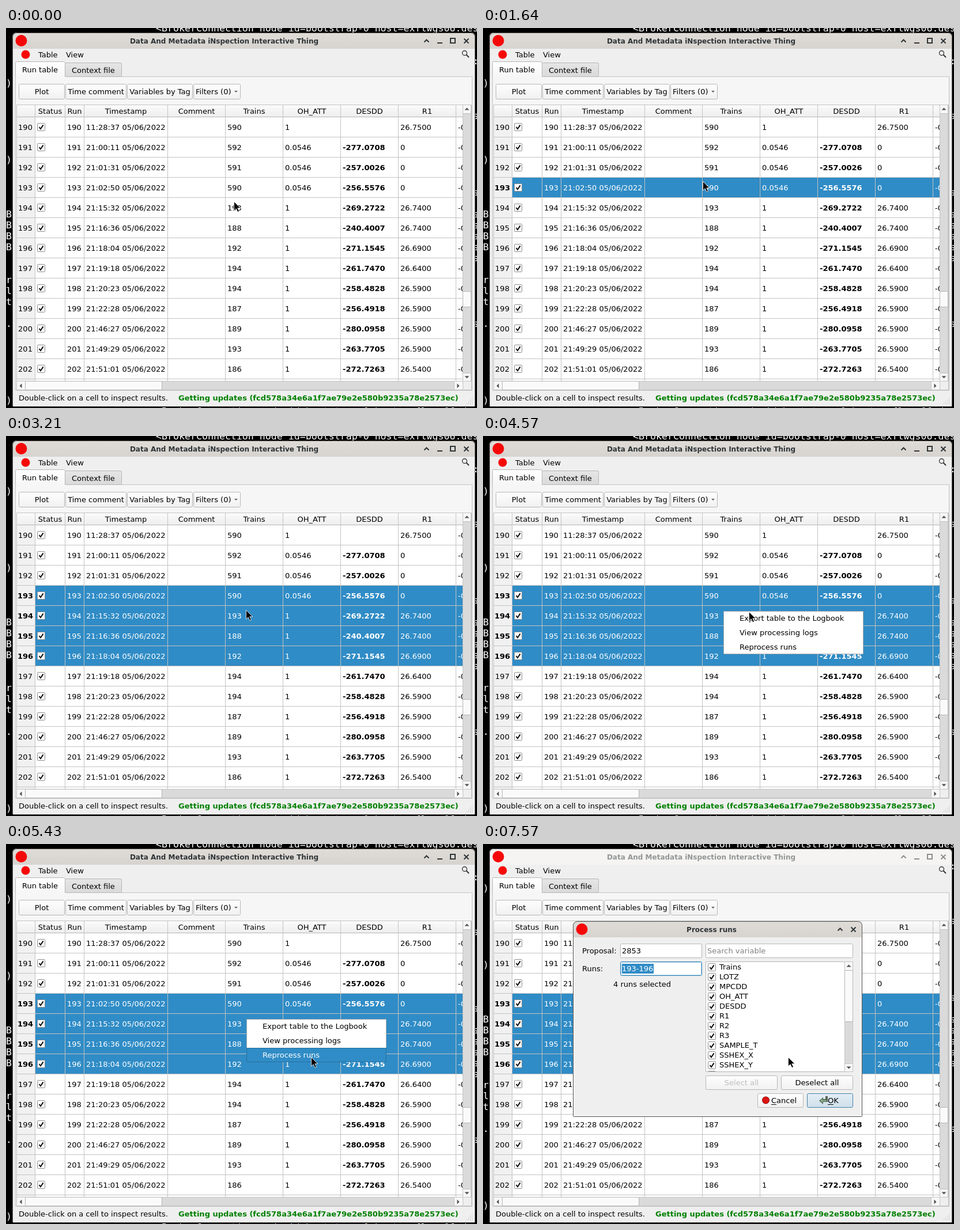
These frames come from a looping animation (817 px wide and 660 px high, 8000 ms). An HTML page with a canvas:

```html
<!DOCTYPE html>
<html lang="en">
<head>
<meta charset="utf-8">
<title>Run table</title>
<style>
html, body { margin: 0; width: 100%; height: 100%; overflow: hidden; background: #000; }
canvas { display: block; width: 817px; height: 660px; }
</style>
</head>
<body>
<canvas id="stage" width="817" height="660"></canvas>
<script>
const ctx = document.getElementById('stage').getContext('2d');
const LOOP = 8000, FPS = 14;
const SANS = '13px "DejaVu Sans", sans-serif';
const BOLD = 'bold 13px "DejaVu Sans", sans-serif';
const TITLE = 'bold 12px "DejaVu Sans", sans-serif';
const MONO = '16.6px "DejaVu Sans Mono", monospace';
const BLUE = '#308cc6', BG = '#efefef', GRID = '#c3c3c3', EDGE = '#b6b6b6';

// Ticks at which the state changes
const SELECT_ONE = 23, SELECT_FOUR = 33, MENU = 53, HOVER = 65, FRAME = 99, DIALOG = 100, CARET_OFF = 106;

// Pointer path: tick, x, y
const PATH = [
  [0, 395, 301], [10, 395, 301], [17, 381, 266], [32, 381, 266], [33, 386, 387], [42, 386, 387],
  [45, 416, 302], [60, 416, 302], [64, 461, 305], [72, 527, 362], [74, 567, 369], [75, 567, 369],
  [76, 529, 370], [200, 529, 370]
];

const COLUMNS = [50, 102, 135, 280, 380, 480, 580, 680, 780];
const HEADERS = ['Status', 'Run', 'Timestamp', 'Comment', 'Trains', 'OH_ATT', 'DESDD', 'R1'];
const ROWS = `11:28:37 590 1 . 26.7500
21:00:11 592 0.0546 -277.0708 0
21:01:31 591 0.0546 -257.0026 0
21:02:50 590 0.0546 -256.5576 0
21:15:32 193 1 -269.2722 26.7400
21:16:36 188 1 -240.4007 26.7400
21:18:04 192 1 -271.1545 26.6900
21:19:18 194 1 -261.7470 26.6400
21:20:23 194 1 -258.4828 26.5900
21:22:28 187 1 -256.4918 26.5900
21:46:27 189 1 -280.0958 26.5900
21:49:29 193 1 -263.7705 26.5900
21:51:01 186 1 -272.7263 26.5400`.split('\n').map(line => line.split(' '));
const MENU_ITEMS = ['Export table to the Logbook', 'View processing logs', 'Reprocess runs'];
const VARIABLES = ['Trains', 'LOTZ', 'MPCDD', 'OH_ATT', 'DESDD', 'R1', 'R2', 'R3', 'SAMPLE_T', 'SSHEX_X', 'SSHEX_Y', ''];

function text(s, x, y, color = '#000', font = SANS, align = 'left') {
  ctx.font = font;
  ctx.fillStyle = color;
  ctx.textAlign = align;
  ctx.fillText(s, x, y);
}

function fill(x, y, w, h, color) {
  ctx.fillStyle = color;
  ctx.fillRect(x, y, w, h);
}

function shade(y, h, top, bottom) {
  const g = ctx.createLinearGradient(0, y, 0, y + h);
  g.addColorStop(0, top);
  g.addColorStop(1, bottom);
  return g;
}

function box(x, y, w, h, color, edge, radius = 0) {
  ctx.beginPath();
  ctx.roundRect(x + .5, y + .5, w - 1, h - 1, radius);
  ctx.fillStyle = color;
  ctx.fill();
  ctx.strokeStyle = edge;
  ctx.lineWidth = 1;
  ctx.stroke();
}

function line(points, color = '#000', width = 1) {
  ctx.beginPath();
  points.forEach(([x, y]) => ctx.lineTo(x, y));
  ctx.strokeStyle = color;
  ctx.lineWidth = width;
  ctx.stroke();
}

function shape(points, color) {
  ctx.beginPath();
  points.forEach(([x, y]) => ctx.lineTo(x, y));
  ctx.closePath();
  ctx.fillStyle = color;
  ctx.fill();
}

function disc(x, y, r, color) {
  ctx.beginPath();
  ctx.arc(x, y, r, 0, Math.PI * 2);
  ctx.fillStyle = color;
  ctx.fill();
}

function clipped(x, y, w, h, draw) {
  ctx.save();
  ctx.beginPath();
  ctx.rect(x, y, w, h);
  ctx.clip();
  draw();
  ctx.restore();
}

function arrow(x, y, dx, dy) {
  shape([[x + dx * 2, y + dy * 2], [x - dx * 2 + dy * 4, y - dy * 2 + dx * 4],
    [x - dx * 2 - dy * 4, y - dy * 2 - dx * 4]], '#505050');
}

function button(x, y, w, h, label, color = '#000') {
  box(x, y, w, h, shade(y, h, '#fefefe', '#f1f1f1'), EDGE, 2);
  text(label, x + w / 2, y + h / 2 + 4.5, color, SANS, 'center');
}

function checkbox(x, y) {
  box(x, y, 14, 14, '#fff', '#8c8c8c', 1);
  line([[x + 3.5, y + 7], [x + 6, y + 10.3], [x + 10.6, y + 3.4]], '#111', 2);
}

function chevron(x, y, color) {
  line([[x - 4, y + 2.5], [x, y - 1.5], [x + 4, y + 2.5]], color, 2);
}

function cross(x, y, color) {
  line([[x - 4, y - 4], [x + 4, y + 4]], color, 2);
  line([[x - 4, y + 4], [x + 4, y - 4]], color, 2);
}

function titleBar(x, y, w, label, active) {
  ctx.beginPath();
  ctx.roundRect(x, y, w, 28, [7, 7, 0, 0]);
  ctx.fillStyle = active ? shade(y, 28, '#dfdcd8', '#d7d3cf') : '#f5f4f3';
  ctx.fill();
  text(label, x + w / 2 - (w > 600 ? 34 : 10.5), y + 18.5, active ? '#2e3436' : '#929595', TITLE, 'center');
  disc(x + 15.5, y + 14, 10, '#f60808');
}

function outline(x, y, w, h) {
  ctx.beginPath();
  ctx.roundRect(x + .5, y + .5, w - 1, h - 1, [7, 7, 1, 1]);
  ctx.strokeStyle = '#55534f';
  ctx.lineWidth = 1;
  ctx.stroke();
}

function terminal(scrolled) {
  fill(0, 0, 817, 660, '#000');
  const shift = scrolled ? -19 : 0;
  const put = (s, x, row) => text(s, x, 6 + row * 19 + shift, '#fff', MONO);
  const log = '<BrokerConnection node_id=bootstrap-0 host=exflwgs06.desy.de';
  text(log, 260, 6, '#fff', MONO);
  if (!scrolled) put(log, 260, 35);
  [[')', 5], [')', 12], ['B', 17], ['B', 18], ['B', 19], ['B', 20], ['r', 23], ['l', 24], ['t', 25], ['.', 27], [')', 34]]
    .forEach(([s, row]) => put(s, 0, row));
  [3, 8, 15, 17, 18, 19, 20, 21, 27].forEach(row => put(row === 3 ? ':' : 's', 810, row));
}

function windowChrome(active) {
  const ink = active ? '#2e3436' : '#8b8e8f';
  fill(12, 36, 801, 621, BG);
  titleBar(11, 8, 803, 'Data And Metadata iNspection Interactive Thing', active);
  chevron(729.5, 22, ink);
  fill(748, 25, 9, 2, ink);
  ctx.strokeStyle = ink;
  ctx.lineWidth = 2;
  ctx.strokeRect(771, 18, 8, 8);
  cross(798.5, 22.5, ink);
  outline(11, 8, 803, 650);

  disc(34, 46, 7.5, '#f60808');
  text('Table', 56, 51);
  text('View', 104, 51);
  ctx.beginPath();
  ctx.arc(795.5, 43.5, 4, 0, Math.PI * 2);
  ctx.strokeStyle = '#333';
  ctx.lineWidth = 1.3;
  ctx.stroke();
  line([[798.5, 46.5], [803, 51]], '#333', 2);

  box(16, 84, 793, 546, '#f6f6f6', GRID);
  box(102, 60, 99, 25, shade(60, 25, '#e6e6e6', '#d9d9d9'), EDGE, 2);
  box(16, 58, 87, 28, shade(58, 28, '#fff', '#f6f6f6'), EDGE, 2);
  fill(17, 83, 85, 4, '#f6f6f6');
  text('Run table', 28, 77);
  text('Context file', 114, 78);

  button(22, 97, 80, 27, 'Plot');
  button(103, 97, 106, 27, 'Time comment');
  button(210, 97, 114, 27, 'Variables by Tag');
  button(325, 97, 82, 27, '');
  text('Filters (0)', 329, 115);
  shape([[396, 109], [402, 109], [399, 112]], '#606060');

  text('Double-click on a cell to inspect results.', 22, 647);
  text('Getting updates (fcd578a34e6a1f7ae79e2e580b9235a78e2573ec)', 299, 647, '#008000', BOLD);
  for (let i = 0; i < 4; i++)
    for (let j = 0; j <= i; j++) fill(808 - j * 3, 643 + i * 3, 1, 1, '#b0b0b0');
}

function table(first, last, focus) {
  box(18, 133, 790, 496, '#fff', GRID);
  fill(19, 134, 774, 20, shade(134, 20, '#fbfbfb', '#eeeeee'));
  fill(19, 155, 31, 459, '#f1f1f1');
  HEADERS.forEach((name, i) => {
    const right = COLUMNS[i + 1];
    text(name, (COLUMNS[i] + right) / 2 + .5, 149, '#000', SANS, 'center');
  });

  clipped(19, 134, 774, 480, () => {
    ROWS.forEach(([time, trains, att, desdd, r1], i) => {
      const top = 155 + i * 35, base = top + 22, run = 190 + i;
      const on = run >= first && run <= last, ink = on ? '#fff' : '#000';
      if (on) fill(51, top, 742, 35, BLUE);
      text(run, 33.5, base, '#000', on ? BOLD : SANS, 'center');
      checkbox(54, top + 10);
      text(run, 106, base, ink);
      text(time + ' 05/06/2022', 139, base, ink);
      text(trains, 384, base, ink);
      text(att, 484, base, ink);
      if (desdd !== '.') text(desdd, 584, base, ink, BOLD);
      text(r1, 684, base, ink);
      text('-0.0', 784, base, ink);
      fill(19, top + 34, 774, 1, GRID);
    });
    fill(19, 154, 774, 1, EDGE);
    COLUMNS.forEach(x => fill(x, 134, 1, 480, GRID));
    if (focus) {
      ctx.setLineDash([1, 1]);
      ctx.strokeStyle = '#1f6c9e';
      ctx.lineWidth = 1;
      ctx.strokeRect(381.5, 155.5 + (focus - 190) * 35, 98, 33);
      ctx.setLineDash([]);
    }
  });

  box(792, 133, 15, 481, '#dadada', GRID);
  box(792, 133, 15, 16, '#f8f8f8', GRID);
  box(792, 457, 15, 28, '#fafafa', EDGE);
  box(792, 599, 15, 15, '#f8f8f8', GRID);
  arrow(799.5, 140.5, 0, -1);
  arrow(799.5, 606.5, 0, 1);
  box(18, 613, 775, 16, '#dadada', GRID);
  box(18, 613, 16, 16, '#f8f8f8', GRID);
  box(33, 613, 238, 16, '#fafafa', EDGE);
  box(777, 613, 16, 16, '#f8f8f8', GRID);
  arrow(25.5, 621.5, -1, 0);
  arrow(784.5, 621.5, 1, 0);
  fill(793, 614, 14, 14, BG);
}

function contextMenu(active) {
  box(417, 304, 243, 75, '#fff', '#a9a9a9');
  MENU_ITEMS.forEach((label, i) => {
    const on = i === active;
    if (on) box(417, 304 + i * 25, 243, 25, BLUE, '#266f9e');
    text(label, 445, 321 + i * 25, on ? '#fff' : '#000');
  });
}

function dialogFrame() {
  fill(157, 162, 3, 311, '#f1f1f1');
  fill(653, 162, 4, 311, '#f1f1f1');
  fill(157, 469, 500, 4, '#f1f1f1');
  titleBar(156, 134, 502, 'Process runs', true);
  chevron(619.5, 148, '#2e3436');
  cross(642.5, 148.5, '#2e3436');
  outline(156, 134, 502, 340);
}

function dialogBody(caret) {
  fill(157, 162, 500, 311, BG);
  text('Proposal:', 172, 190);
  box(238, 173, 142, 25, '#fff', EDGE, 2);
  text('2853', 241, 190);
  text('Runs:', 172, 221);
  box(238, 204, 142, 25, '#fff', '#3583b5', 2);
  ctx.strokeStyle = '#a9cfe6';
  ctx.strokeRect(239.5, 205.5, 139, 22);
  fill(241, 208, 55, 17, BLUE);
  text('193-196', 241, 221, '#fff');
  if (caret) fill(295, 208, 1, 17, '#000');
  text('4 runs selected', 226, 248);

  box(386, 173, 256, 25, '#fff', EDGE, 2);
  text('Search variable', 389, 190, '#808080');
  box(386, 204, 256, 192, '#fff', EDGE);
  clipped(387, 205, 240, 190, () => VARIABLES.forEach((name, i) => {
    checkbox(390, 207 + i * 17);
    text(name, 410, 218 + i * 17);
  }));
  box(627, 204, 15, 192, '#dadada', GRID);
  box(627, 204, 15, 16, '#f8f8f8', GRID);
  box(627, 219, 15, 90, '#fafafa', EDGE);
  box(627, 381, 15, 15, '#f8f8f8', GRID);
  arrow(634.5, 211.5, 0, -1);
  arrow(634.5, 388.5, 0, 1);

  button(386, 402, 125, 25, 'Select all', '#bebebe');
  button(517, 402, 125, 25, 'Deselect all');
  button(476, 433, 80, 25, '');
  disc(490.5, 445, 6.5, '#8f1010');
  disc(490.5, 445, 5.5, '#dc1414');
  text('Cancel', 500, 450);
  fill(500, 452, 9, 1, '#000');
  box(562, 433, 80, 25, shade(433, 25, '#e3eef6', '#cfdfea'), '#4682a8', 2);
  shape([[583, 446], [590, 440], [590, 443], [594, 443], [594, 438], [598, 438], [598, 448], [590, 448], [590, 452]], '#59665a');
  shape([[585, 446], [589, 442.5], [589, 445], [596, 445], [596, 447], [589, 447], [589, 449.5]], '#86b587');
  text('OK', 598, 450);
  fill(598, 452, 10, 1, '#000');
}

function pointerAt(tick) {
  const i = PATH.findIndex(p => p[0] > tick);
  const [t0, x0, y0] = PATH[i - 1], [t1, x1, y1] = PATH[i];
  const k = (tick - t0) / (t1 - t0);
  return [Math.round(x0 + (x1 - x0) * k), Math.round(y0 + (y1 - y0) * k)];
}

function pointer(x, y) {
  ctx.save();
  ctx.translate(x + .5, y + .5);
  ctx.beginPath();
  [[0, 0], [0, 15.5], [3.6, 12.2], [6.4, 18], [9, 16.8], [6.3, 11.3], [11.3, 11.3]].forEach(p => ctx.lineTo(...p));
  ctx.closePath();
  ctx.fillStyle = '#000';
  ctx.fill();
  ctx.strokeStyle = '#fff';
  ctx.lineWidth = .8;
  ctx.stroke();
  ctx.restore();
}

function render(tick) {
  const [x, y] = pointerAt(tick);
  const last = tick >= SELECT_FOUR ? 196 : tick >= SELECT_ONE ? 193 : 0;
  terminal(tick >= DIALOG);
  windowChrome(tick < FRAME);
  table(193, last, tick < MENU ? last : 0);
  if (tick >= MENU && tick < DIALOG)
    contextMenu(tick >= HOVER ? Math.min(2, Math.floor((y - 305) / 25)) : -1);
  if (tick >= DIALOG) dialogBody(tick < CARET_OFF);
  if (tick >= FRAME) dialogFrame();
  pointer(x, y);
}

const start = performance.now();
let shown = -1;
function loop() {
  const time = Math.max(0, performance.now() - start) % LOOP;
  const tick = Math.floor((time + 5) * FPS / 1000);
  if (tick !== shown) render(shown = tick);
  requestAnimationFrame(loop);
}
loop();
</script>
</body>
</html>
```
